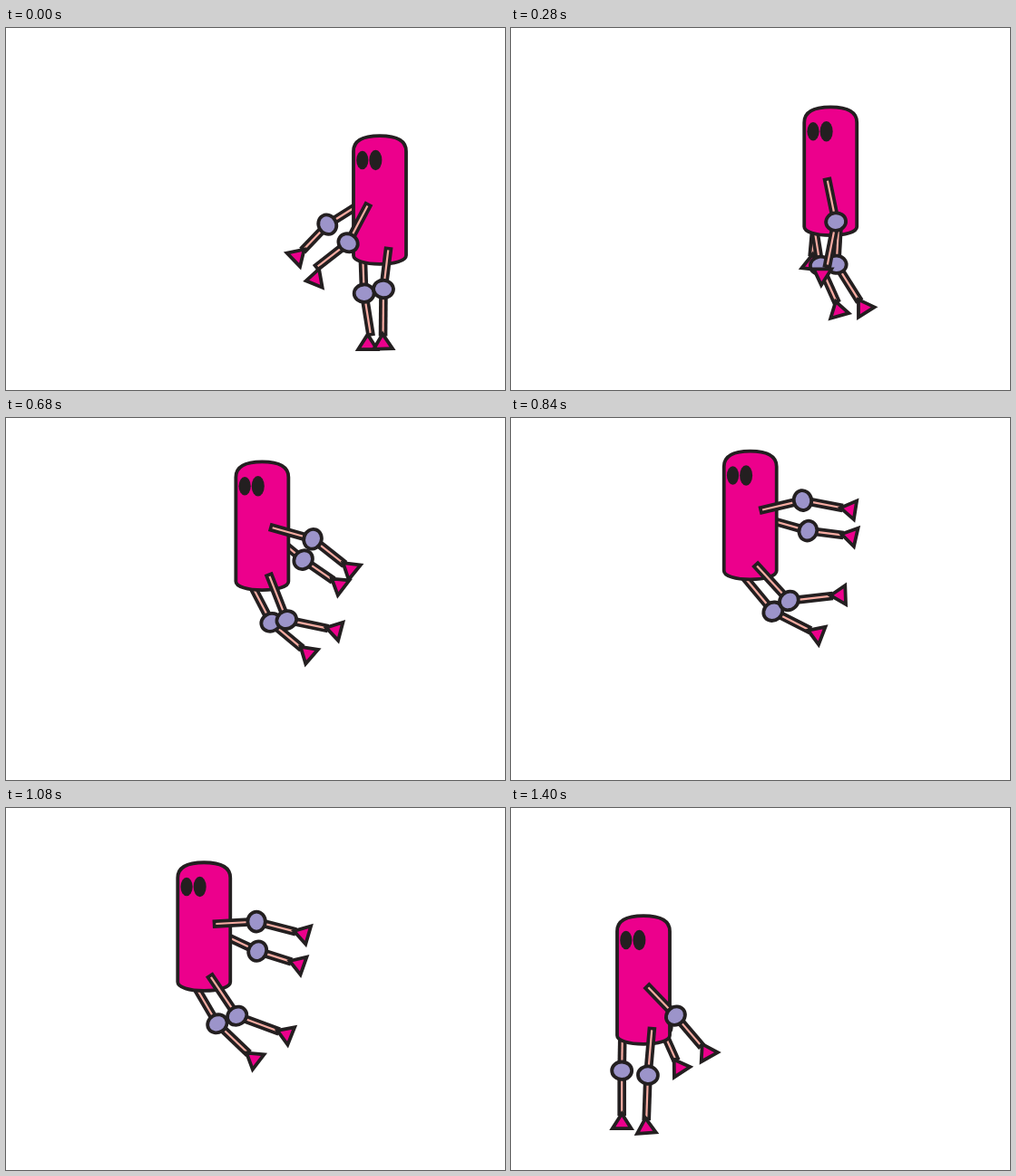
An HTML page with a canvas that plays this animation: 550 px wide and 400 px high, repeating every 1.44 s.

```html
<!DOCTYPE html>
<html lang="en">
<head>
<meta charset="utf-8">
<title>Jumping figure</title>
<style>
  html, body { margin: 0; width: 100%; height: 100%; overflow: hidden; background: #fff; }
  canvas { display: block; }
</style>
</head>
<body>
<canvas id="stage" width="550" height="400"></canvas>
<script>
const ctx = document.getElementById('stage').getContext('2d');
const STEP = 40, STEPS = 36;
const INK = '#231f20', PINK = '#ec008c', BONE = '#f7aca2', JOINT = '#9c94ca';
const LINE = 3.8;

// Key poses: take-off, flight, apex, landing. Five-value tracks add one mid-swing pose.
const KEYS = { 4: [0, 13, 23, 35], 5: [0, 7, 13, 23, 35] };

const BODY = { x: [412, 301, 254.4, 146], top: [119.2, 60.2, 30.8, 119.2] };

// Angles in degrees, clockwise from the right; root is relative to the top centre of the body.
const backArm = {
  rootX: 0, rootY: 66, start: [13, 3],
  upper: [151, 67, 7, 71], upperLen: [66, 56.5, 70, 61],
  lower: [133.6, 62, -6.5, 66], reach: [48, 49, 47, 48],
  hand: [136, 62, 0.5, 57], swing: 0
};
const backLeg = {
  rootX: [-19, -19, -5, -23], rootY: [126, 128, 140, 123], start: [-6, 0],
  upper: [88, 75, 44, 91], upperLen: [48, 49, 52, 48],
  lower: [81, 53, 20.5, 90], reach: [56, 51.4, 55, 58],
  hand: [90, 61, 11, 90], swing: [5, 0, 0, 0]
};
const frontLeg = {
  rootX: 9, rootY: 128.6, start: [-6, 0],
  upper: [97, 90, 36.8, 94.9], upperLen: [41, 49, 50, 47.5],
  lower: [90.5, 30, -15.5, 92], reach: [60, 53, 57.5, 58],
  hand: [88, 31.5, -10.5, 86], swing: 0
};
const frontArm = {
  rootX: -3, rootY: 65, start: [12.5, 2.9],
  upper: [121, 48.2, -24.5, 49.8], upperLen: [62, 62.5, 61.5, 59.5],
  lower: [142, 66, -3, 49.5], reach: [54, 60, 53, 53, 53],
  hand: [-10, 69, -6, 60.6], swing: [-10, 4, 0, 0, 0]
};

function track(values, frame) {
  if (typeof values === 'number') return values;
  const keys = KEYS[values.length];
  let i = 0;
  while (i < keys.length - 2 && frame >= keys[i + 1]) i++;
  const k = (frame - keys[i]) / (keys[i + 1] - keys[i]);
  return values[i] + (values[i + 1] - values[i]) * k;
}

const rad = deg => deg * Math.PI / 180;

// Point at local offset (along, across) from p in a frame turned by deg.
function offset(p, deg, along, across = 0) {
  const c = Math.cos(rad(deg)), s = Math.sin(rad(deg));
  return [p[0] + along * c - across * s, p[1] + along * s + across * c];
}

function paint(fill) {
  ctx.fillStyle = fill;
  ctx.strokeStyle = INK;
  ctx.lineWidth = LINE;
  ctx.fill();
  ctx.stroke();
}

function bone(a, b) {
  const length = Math.hypot(b[0] - a[0], b[1] - a[1]);
  ctx.save();
  ctx.translate(a[0], a[1]);
  ctx.rotate(Math.atan2(b[1] - a[1], b[0] - a[0]));
  ctx.fillStyle = INK;
  ctx.fillRect(0, -4.8, length, 9.6);
  ctx.fillStyle = BONE;
  ctx.fillRect(3.6, -1.1, length - 7.2, 2.2);
  ctx.restore();
}

function joint(p, deg) {
  ctx.beginPath();
  ctx.ellipse(p[0], p[1], 9.7, 11, rad(deg), 0, 2 * Math.PI);
  paint(JOINT);
}

function hand(p, deg) {
  ctx.beginPath();
  ctx.moveTo(...offset(p, deg, -10.4));
  ctx.lineTo(...offset(p, deg, 6, -10.4));
  ctx.lineTo(...offset(p, deg, 6, 10.4));
  ctx.closePath();
  paint(PINK);
}

function limb(part, x, top, frame) {
  const at = name => track(part[name], frame);
  const root = [x + at('rootX'), top + at('rootY')];
  const upper = at('upper'), lower = at('lower'), reach = at('reach');
  const bend = offset(root, upper, at('upperLen'));
  bone(offset(root, upper, ...part.start), bend);
  bone(bend, offset(bend, lower, reach - 8));
  hand(offset(bend, lower + at('swing'), reach), at('hand'));
  joint(bend, upper);
}

function torso(x, top) {
  ctx.beginPath();
  ctx.moveTo(x - 29, top + 17);
  ctx.bezierCurveTo(x - 29, top + 5, x - 18, top, x, top);
  ctx.bezierCurveTo(x + 18, top, x + 29, top + 5, x + 29, top + 17);
  ctx.lineTo(x + 29, top + 132);
  ctx.bezierCurveTo(x + 29, top + 138, x + 16, top + 141.7, x, top + 141.7);
  ctx.bezierCurveTo(x - 16, top + 141.7, x - 29, top + 138, x - 29, top + 132);
  ctx.closePath();
  paint(PINK);
  ctx.fillStyle = INK;
  for (const [dx, rx, ry] of [[-19.2, 6.6, 10.3], [-4.6, 7, 11.3]]) {
    ctx.beginPath();
    ctx.ellipse(x + dx, top + 26.8, rx, ry, 0, 0, 2 * Math.PI);
    ctx.fill();
  }
}

function draw(frame) {
  const x = track(BODY.x, frame), top = track(BODY.top, frame);
  ctx.fillStyle = '#fff';
  ctx.fillRect(0, 0, 550, 400);
  limb(backArm, x, top, frame);
  limb(backLeg, x, top, frame);
  torso(x, top);
  limb(frontLeg, x, top, frame);
  limb(frontArm, x, top, frame);
}

const begin = performance.now();
function tick() {
  draw(Math.floor((performance.now() - begin) / STEP) % STEPS);
  requestAnimationFrame(tick);
}
tick();
</script>
</body>
</html>
```
